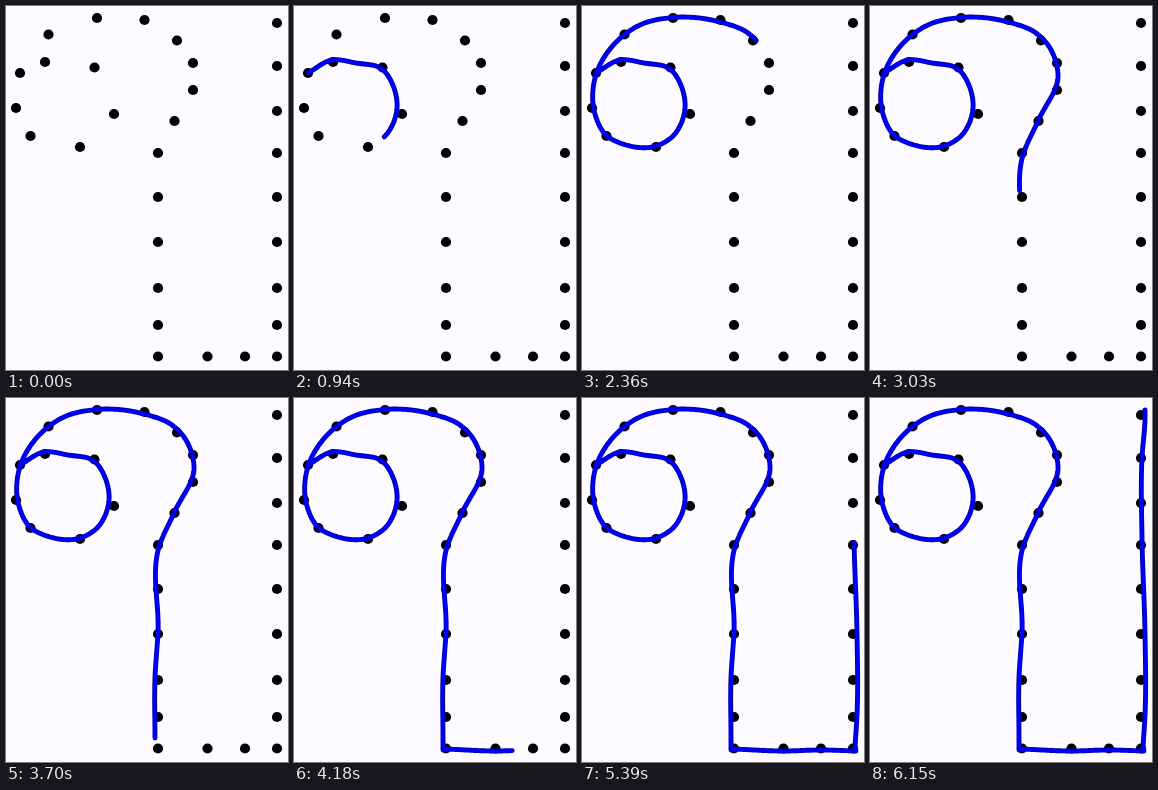
Recreate the animation shown at these times as an HTML page with a canvas. Size 282 by 364 pixels, loop 6210 ms.

```html
<!DOCTYPE html>
<html lang="en">
<head>
<meta charset="utf-8">
<title>Connect the dots</title>
<style>
  html, body { margin: 0; width: 100%; height: 100%; overflow: hidden; background: #fdfbff; }
  canvas { display: block; }
</style>
</head>
<body>
<canvas id="stage" width="282" height="364"></canvas>
<script>
const ctx = document.getElementById('stage').getContext('2d');
const LOOP = 6210, START = 120, STEP = 30.3;

// The hook's dots are placed by hand; the two columns share their rows
const hook = [
  [14, 67], [39, 56], [88.5, 61.5], [108, 108], [74, 141], [24.5, 130], [10, 102],
  [42.5, 28.5], [91, 12], [138.5, 14], [171, 34.5], [187, 57], [187, 84], [168.5, 115]
];
const rows = [17, 60, 105, 147, 191, 236, 282, 319, 350.5];
const dots = [
  ...hook,
  ...rows.map(y => [271, y]),
  ...rows.slice(3).map(y => [152, y]),
  [201.5, 350.5], [239, 350.5]
];

// Smooth curves through key points [x, y, arrival time where the pace changes]
const curves = [
  [
    [14, 67, 95], [38, 54], [62, 57], [88, 63], [100, 82], [103, 102], [90, 131, 940],
    [74, 140], [44, 139], [24, 129], [12, 104], [13, 72], [42, 29], [59, 18.5, 1760],
    [91, 11.5], [138, 16], [166, 27], [178, 39, 2360], [188, 68], [168, 115],
    [153, 149], [152, 234], [149, 280], [149, 341, 3700], [149, 352]
  ],
  [[152, 351], [200, 353], [240, 352], [274, 353]],
  [[273, 349], [275, 317, 4730], [275, 236], [272, 140], [272, 60], [275, 20, 5820], [275, 12, 6120]]
];

const trail = [];
const keys = [];

function addPoint(x, y) {
  const q = trail[trail.length - 1];
  trail.push({ x, y, d: q ? q.d + Math.hypot(x - q.x, y - q.y) : 0 });
}

function markKey(p) {
  if (p[2]) keys.push([p[2], trail[trail.length - 1].d]);
}

function heading(a, b) {
  const len = Math.hypot(b[0] - a[0], b[1] - a[1]);
  return { x: (b[0] - a[0]) / len, y: (b[1] - a[1]) / len, len };
}

// Direction at a point: the nearer neighbour counts for more
function tangent(curve, i) {
  const before = i > 0 && heading(curve[i - 1], curve[i]);
  const after = i < curve.length - 1 && heading(curve[i], curve[i + 1]);
  if (!before) return after;
  if (!after) return before;
  const sum = before.len + after.len;
  return {
    x: (before.x * after.len + after.x * before.len) / sum,
    y: (before.y * after.len + after.y * before.len) / sum
  };
}

for (const curve of curves) {
  addPoint(curve[0][0], curve[0][1]);
  markKey(curve[0]);
  for (let i = 1; i < curve.length; i++) {
    const a = curve[i - 1], b = curve[i];
    const ta = tangent(curve, i - 1), tb = tangent(curve, i);
    const { len } = heading(a, b);
    const n = Math.max(4, Math.ceil(len / 2));
    for (let k = 1; k <= n; k++) {
      const s = k / n, r = 1 - s;
      const h0 = r * r * (1 + 2 * s), h1 = s * s * (3 - 2 * s);
      const g0 = s * r * r * len, g1 = -s * s * r * len;
      addPoint(
        h0 * a[0] + h1 * b[0] + g0 * ta.x + g1 * tb.x,
        h0 * a[1] + h1 * b[1] + g0 * ta.y + g1 * tb.y
      );
    }
    markKey(b);
  }
}

function reach(t) {
  for (let i = 1; i < keys.length; i++) {
    const [t0, d0] = keys[i - 1], [t1, d1] = keys[i];
    if (t <= t1) return d0 + (d1 - d0) * (t - t0) / (t1 - t0);
  }
  return keys[keys.length - 1][1];
}

function trace(end) {
  ctx.beginPath();
  ctx.moveTo(trail[0].x, trail[0].y);
  for (let i = 1; i < trail.length && trail[i - 1].d < end; i++) {
    const p = trail[i - 1], q = trail[i];
    const s = Math.min(1, (end - p.d) / (q.d - p.d));
    ctx.lineTo(p.x + (q.x - p.x) * s, p.y + (q.y - p.y) * s);
  }
}

function draw(time) {
  const t = time % LOOP;
  ctx.fillStyle = '#fdfbff';
  ctx.fillRect(0, 0, 282, 364);
  ctx.fillStyle = '#000';
  for (const [x, y] of dots) {
    ctx.beginPath();
    ctx.arc(x, y, 5.1, 0, Math.PI * 2);
    ctx.fill();
  }
  if (t < START) return;
  const shown = START + Math.floor((t - START) / STEP) * STEP;
  trace(reach(shown));
  ctx.lineJoin = ctx.lineCap = 'round';
  // Dark rim under a bright core
  for (const [width, color] of [[4.9, '#0000b4'], [3, '#0000fa']]) {
    ctx.lineWidth = width;
    ctx.strokeStyle = color;
    ctx.stroke();
  }
}

const begin = performance.now();
function frame() {
  draw(performance.now() - begin);
  requestAnimationFrame(frame);
}
frame();
</script>
</body>
</html>
```
